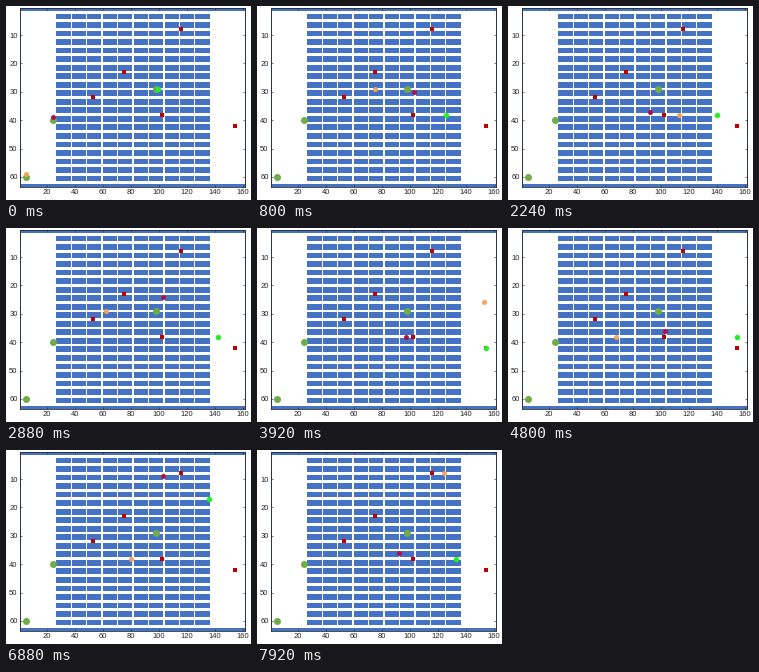
Recreate the animation shown at these times as a matplotlib script. Size 245 px wide and 194 px high, loop 8000 ms.

```python
import matplotlib.pyplot as plt
import numpy as np
from matplotlib.animation import FuncAnimation

W, H, DPI = 245, 194, 100
FRAMES, INTERVAL = 100, 80
ROWS, COLS = 63, 161
LEFT, RIGHT, TOP, BOTTOM = 13.6, 239.2, 2.2, 180.8
PX = 72 / DPI

plt.rcParams["font.family"] = "Liberation Sans"

# Task cells and agent homes, as (column, row)
A, B, C, D, E = (53, 32), (75, 23), (116, 8), (102, 38), (154, 42)
HOMES = [(5, 60), (24, 40), (98, 29)]


def warehouse():
    """Shelves are two rows high and ten columns wide, one cell apart."""
    grid = np.zeros((ROWS + 1, COLS + 1), bool)
    for row in range(3, 62, 3):
        for col in range(27, 136, 11):
            grid[row:row + 2, col:col + 10] = True
    grid[[1, ROWS], :] = True
    grid[:, [1, COLS]] = True
    return np.where(grid[1:, 1:, None], (68, 114, 196), 255).astype(np.uint8)


def leg(start, end, *corners):
    return [start, *corners, end]


def back(path):
    return path[::-1]


def exit_leg(col):
    return leg(C, E, (col, 8), (col, 42))


A_C = leg(A, C, (59, 32), (59, 29), (114, 29), (114, 8))
A_E = leg(A, E, (59, 32), (59, 38), (154, 38))
A_D = leg(A, D, (92, 32), (92, 38))
D_C = leg(D, C, (103, 38), (103, 8))
C_A = leg(C, A, (103, 8), (103, 32))
D_E = leg(D, E, (154, 38))
D_E_LOW = leg(D, E, (103, 38), (103, 41), (154, 41))
B_E = leg(B, E, (103, 23), (103, 38), (154, 38))

# Each route lists (arrival step, path)
ORANGE_ROUTE = [
    (7.5, leg(HOMES[0], A, (5, 32))), (16.2, A_C), (23.4, exit_leg(139)),
    (34.8, back(A_E)), (43.5, A_C), (50.7, exit_leg(153)),
    (62.2, back(A_E)), (70.9, A_C), (78.1, exit_leg(153)),
    (89.4, back(A_E)), (98.2, A_C), (105.4, exit_leg(139)),
]
DARK_ROUTE = [
    (3.6, leg(HOMES[1], A, (24, 32))), (9.1, A_D), (13.7, D_C),
    (18.9, back(D_C)), (24.4, back(A_D)), (28.9, A_D), (33.1, D_C),
    (37.5, back(D_C)), (44, back(A_D)), (49.5, A_D), (54, D_C),
    (60.5, back(D_C)), (68.6, back(A_D)), (74.1, A_D), (78.5, D_C),
    (83, back(D_C)), (87.4, D_C), (94.7, C_A), (100.2, A_D),
]
GREEN_ROUTE = [
    (1.3, leg(HOMES[2], D, (103, 29), (103, 38))), (6.9, D_E),
    (16.4, back(B_E)), (26.2, B_E), (31.9, back(D_E)), (37.6, D_E),
    (43.3, back(D_E)), (49, D_E), (54.7, back(D_E)), (60.4, D_E),
    (67.4, back(D_E)), (74.8, D_E_LOW), (83.1, back(exit_leg(136))),
    (90.3, exit_leg(136)), (95.9, back(D_E)), (101.5, D_E),
]


def along(path, fraction):
    points = np.array(path, float)
    steps = np.abs(np.diff(points, axis=0)).sum(axis=1)
    length = np.concatenate([[0], np.cumsum(steps)])
    where = fraction * length[-1]
    return [round(np.interp(where, length, points[:, k])) for k in (0, 1)]


def position(route, step):
    begin = -0.1
    for arrival, path in route:
        if step <= arrival:
            return along(path, (step - begin) / (arrival - begin))
        begin = arrival
    return route[-1][1][-1]


fig = plt.figure(figsize=(W / DPI, H / DPI), dpi=DPI, facecolor="white")
ax = fig.add_axes([LEFT / W, 1 - BOTTOM / H,
                   (RIGHT - LEFT) / W, (BOTTOM - TOP) / H])
ax.imshow(warehouse(), extent=(0.5, COLS + 0.5, ROWS + 0.5, 0.5),
          aspect="auto", interpolation="nearest")
ax.set_xticks(range(20, 161, 20))
ax.set_yticks(range(10, 61, 10))
ax.tick_params(direction="in", top=True, right=True, length=2 * PX,
               width=0.6 * PX, pad=2 * PX, labelsize=7.6 * PX,
               color="#262626", labelcolor="#262626")
for spine in ax.spines.values():
    spine.set(linewidth=0.8 * PX, color="#262626")


def markers(cells, shape, size, color, z):
    x, y = zip(*cells)
    return ax.plot(x, y, shape, markersize=size * PX, color=color,
                   markeredgewidth=0, linestyle="none", zorder=z,
                   clip_on=False)[0]


markers(HOMES, "o", 7, "#70ad47", 3)
markers([A, B, C, D, E], "s", 4.2, "#c00000", 3)

agents = [
    (markers([HOMES[0]], "o", 5, "#f4a460", 4), ORANGE_ROUTE),
    (markers([HOMES[1]], "o", 5, "#b0104a", 4), DARK_ROUTE),
    (markers([HOMES[2]], "o", 5.4, "#22f022", 4), GREEN_ROUTE),
]


def draw(step):
    for dot, route in agents:
        x, y = position(route, step)
        dot.set_data([x], [y])
    return [dot for dot, _ in agents]


anim = FuncAnimation(fig, draw, frames=FRAMES, interval=INTERVAL,
                     repeat=True, repeat_delay=0, blit=False)
plt.show()
```
